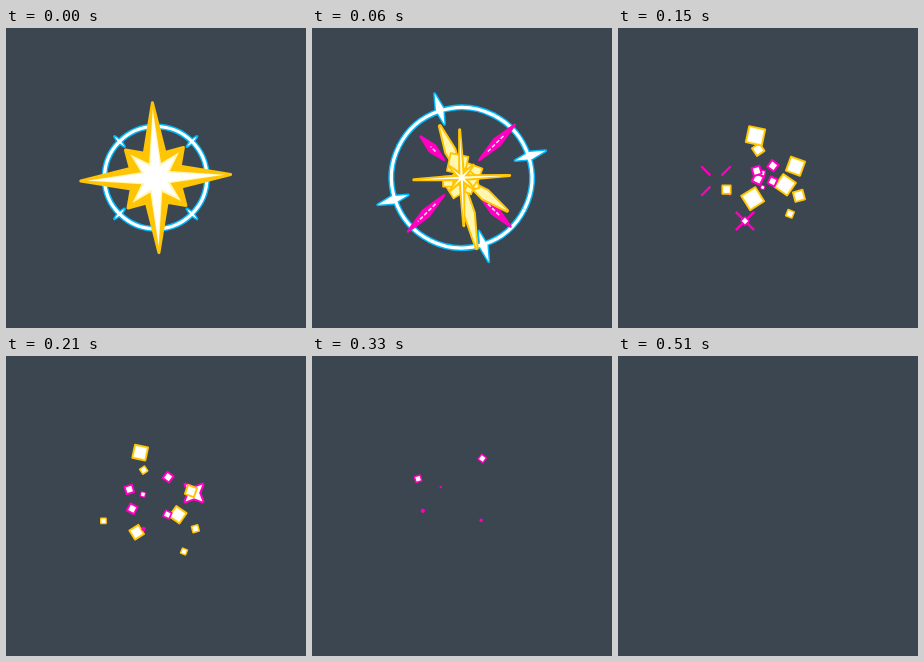
These frames come from a looping animation (300 px wide and 300 px high, 0.54 s). An HTML page with a canvas:

```html
<!DOCTYPE html>
<html>
<head>
<meta charset="utf-8">
<style>
  html, body { margin: 0; height: 100%; overflow: hidden; background: #3b4650; }
  canvas { display: block; }
</style>
</head>
<body>
<canvas id="stage" width="300" height="300"></canvas>
<script>
const ctx = document.getElementById('stage').getContext('2d');
const BG = '#3b4650', CYAN = '#00b8fc', PINK = '#ff00c0', GOLD = '#ffc405', CREAM = '#fff7b0', WHITE = '#fff';
const STEP = 30, STEPS = 18, C = 149.7, RAD = Math.PI / 180;

const polar = (x, y, r, deg) => [x + r * Math.cos(deg * RAD), y + r * Math.sin(deg * RAD)];

function shape(points, fill, stroke, width = 2) {
  ctx.beginPath();
  points.forEach(p => ctx.lineTo(...p));
  ctx.closePath();
  if (stroke) {
    ctx.strokeStyle = stroke;
    ctx.lineWidth = width;
    ctx.stroke();
  }
  ctx.fillStyle = fill;
  ctx.fill();
}

function line(a, b, color, width) {
  ctx.beginPath();
  ctx.moveTo(...a);
  ctx.lineTo(...b);
  ctx.strokeStyle = color;
  ctx.lineWidth = width;
  ctx.stroke();
}

// The radii repeat around the star, evenly spaced in angle
const star = (x, y, radii, count, rot) => Array.from({ length: count }, (_, i) =>
  polar(x, y, radii[i % radii.length], rot + i * 360 / count));

// Diamond lying along a ray from the centre
function lens(deg, from, to, width) {
  const mid = polar(C, C, (from + to) / 2, deg);
  return [polar(C, C, from, deg), polar(...mid, width / 2, deg + 90),
          polar(C, C, to, deg), polar(...mid, width / 2, deg - 90)];
}

function drawRing(k) {
  if (k > 4) return;
  const r = 51.2 + 10.3 * k - .4 * k * k;
  const rot = -45 * .63 ** k;
  const bulge = Math.sin(Math.PI * k / 4);
  const half = 7 + 9 * bulge, width = 3 + 4.5 * bulge;
  const broken = Math.max(0, k - 2);
  const span = 90 - 28 * broken;
  const thick = 3.2 - broken;
  for (let i = 0; i < 4; i++) {
    const mid = rot + i * 90;
    const arc = (reach, color, w) => {
      ctx.beginPath();
      ctx.arc(C, C, r, (mid - reach / 2) * RAD, (mid + reach / 2) * RAD);
      ctx.strokeStyle = color;
      ctx.lineWidth = w;
      ctx.stroke();
    };
    const tick = lens(mid, r + k - half, r + k + half, width);
    arc(span + 1, CYAN, thick + 2.8);
    shape(tick, CYAN, CYAN, 3);
    arc(broken ? span * .7 : span + 1, WHITE, thick);
    shape(tick, WHITE);
  }
}

function drawSpears(k) {
  if (k < 1 || k > 2) return;
  [75, 69, 76, 58].forEach((reach, i) => {
    const deg = i * 90 - 45, from = 12.5 * k, to = reach * (.5 + k / 4);
    shape(lens(deg, from, to, 8), PINK, PINK, 2.5);
    ctx.setLineDash([4, 2]);
    line(polar(C, C, from + 12, deg), polar(C, C, to - 14, deg), '#ffd0f2', 1.6);
    ctx.setLineDash([]);
  });
}

// Angle and length of the jagged splinters
const splinters = [[-113, 56], [78, 72], [36, 56]];

function drawSplinters(k) {
  if (k < 1 || k > 4) return;
  for (const [deg, length] of splinters)
    shape(lens(deg, 2, length * Math.min(1, 2 / k), 9), CREAM, GOLD, 4);
}

function drawStar(k) {
  if (k > 2) return;
  const long = 75 - 13.5 * k, diag = 41 - 12 * k, dip = 27 * .42 ** k;
  const layer = (a, b, c) => star(C, C, [long * a, dip * c, diag * b, dip * c], 16, -2.5);
  shape(layer(1, 1, 1), GOLD, GOLD, 3);
  shape(layer(.92, .84, .58), CREAM);
  shape(layer(.86, .7, .46), WHITE);
}

// Squares fly out radially; spots are x, y at step 9 and the full half size
const swarms = [
  { color: GOLD, inner: .69, life: 9.3,
    spots: [[190, 133, 10], [128, 180, 11], [136, 109, 6.5], [90, 167, 6], [195, 176, 7]] },
  { color: GOLD, inner: .69, life: 11.3,
    spots: [[132, 89, 10], [175, 160, 9.5], [182, 202, 4.5]] },
  { color: PINK, inner: .3, life: 12.5,
    spots: [[117, 154, 6], [132, 134, 3.5], [166, 162, 5], [133, 182, 2.4]] },
  { color: PINK, inner: .3, life: 17,
    spots: [[113, 127, 5.2], [167, 110, 5.2]] }
];

function drawSwarms(k) {
  const decay = .45;
  const travel = (1 - decay ** ((k - 5) / 4)) / (1 - decay);
  for (const { color, inner, life, spots } of swarms) {
    const spread = inner + (1 - inner) * travel;
    if (k < 2 || k > life || spread < 0) continue;
    for (const [px, py, size] of spots) {
      const r = size * (1 - (k / life) ** 3);
      if (r < 1) continue;
      const x = C + (px - C) * spread, y = C + (py - C) * spread;
      const square = half => star(x, y, [half * Math.SQRT2], 4, px * 11 + 45);
      shape(square(r - 1), color, color, 2);
      if (r < 2) continue;
      if (color === GOLD) shape(square(r - 1.8), CREAM);
      if (k > 2) shape(square(Math.max(r * .6, r - 2.6)), WHITE);
    }
  }
}

// x, y, size, first step
const sparkles = [[98, 153, 19, 3], [127, 193, 13, 4], [188, 137, 13, 7]];

function drawSparkles(k) {
  for (const [x, y, size, start] of sparkles) {
    const age = k - start;
    if (age === 0) {
      shape(star(x, y, [size * .92, size * .4], 8, 45), WHITE, PINK, 4);
    } else if (age === 1) {
      for (const deg of [45, 135])
        line(polar(x, y, size, deg), polar(x, y, size, deg + 180), PINK, 2.4);
      shape(star(x, y, [3.2], 4, 0), WHITE, PINK, 3);
    } else if (age === 2) {
      for (let deg = 45; deg < 360; deg += 90)
        line(polar(x, y, size * .42, deg), polar(x, y, size * 1.1, deg), PINK, 2.2);
    }
  }
}

const layers = [drawRing, drawSpears, drawSparkles, drawSplinters, drawSwarms, drawStar];
const begin = performance.now();

function loop() {
  const k = Math.floor((performance.now() - begin) / STEP) % STEPS;
  ctx.fillStyle = BG;
  ctx.fillRect(0, 0, 300, 300);
  ctx.lineJoin = 'round';
  layers.forEach(draw => draw(k));
  requestAnimationFrame(loop);
}
loop();
</script>
</body>
</html>
```
